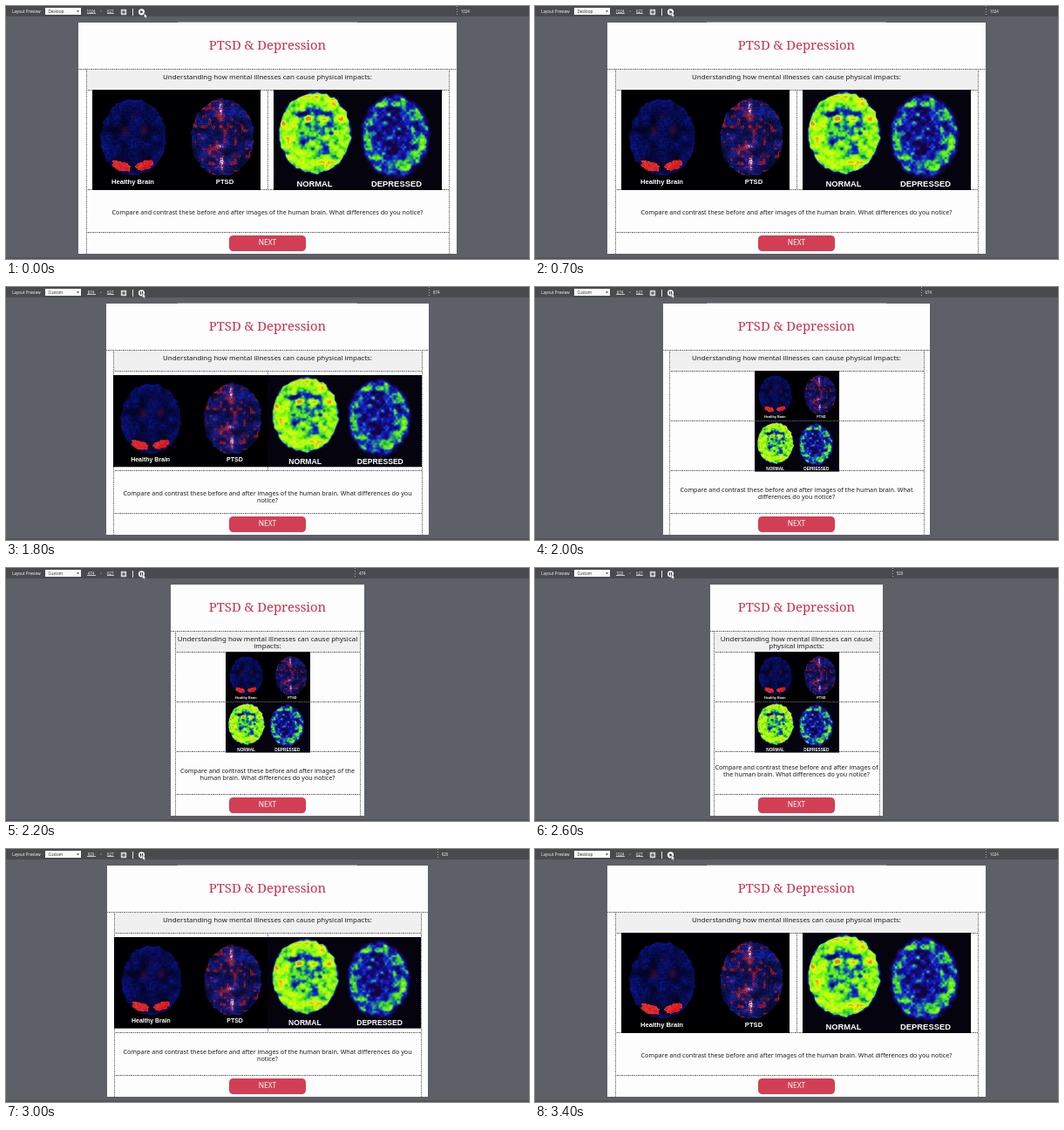
Write an HTML page with a canvas that moves like this. It is 600 by 290 pixels and loops after 3.5 s.

```html
<!DOCTYPE html>
<html lang="en">
<head>
<meta charset="utf-8">
<title>Layout Preview</title>
<style>
html, body { margin: 0; width: 100%; height: 100%; overflow: hidden; }
body { position: relative; background: #5d6066; font-family: "Noto Sans", "Open Sans", sans-serif; color: #1c1c1c; }
div, span, canvas, svg { position: absolute; box-sizing: border-box; white-space: nowrap; }
#bar { left: 0; top: 0; width: 600px; height: 12px; background: #494a4e; color: #f2f2f2; font-size: 4.6px; line-height: 6px; }
#bar span { top: 3.2px; }
#bar .num { font-size: 4.4px; border-bottom: .6px solid #c8c8c8; height: 6px; text-align: center; }
#menu { left: 45px; top: 2.3px; width: 41px; height: 7.4px; background: #fafafa; color: #333; padding: .6px 0 0 3.4px; }
#icons { left: 0; top: 0; width: 180px; height: 22px; }
#marker { top: 0; width: 1px; height: 12px; background: repeating-linear-gradient(#aaa 0 1.5px, transparent 1.5px 3px); }
#handle { left: 197px; top: 18px; width: 206px; height: 1px; background: #96979a; }
#foot { left: 0; top: 288px; width: 600px; height: 2px; background: #54565b; }
#page { top: 19px; height: 265px; background: #fefdfe; }
#band { top: 72px; height: 24px; background: #f0f0f0; }
.h { height: 1px; background: repeating-linear-gradient(90deg, #777 0 1.4px, #ccc 1.4px 2.4px); }
.v { width: 1px; background: repeating-linear-gradient(#888 0 1.4px, #ccc 1.4px 2.4px); }
.scan { width: 193px; height: 114.5px; transform-origin: 0 0; overflow: hidden; color: #fff; font: bold 7.6px/10px "Liberation Sans", Arial, sans-serif; }
.scan canvas { left: 0; top: 0; }
.scan span { width: 80px; text-align: center; }
#scanB { font-size: 9.4px; }
#title { left: 200px; width: 200px; top: 33.6px; text-align: center; font: 14.8px/20px "Noto Serif", serif; color: #c9304a; }
#head, #para { white-space: normal; text-align: center; }
#head { top: 76.5px; font-size: 7.94px; line-height: 8.2px; }
#para { font-size: 7.18px; line-height: 8px; }
#next { left: 256px; top: 262.5px; width: 88px; height: 18.5px; border-radius: 4.5px; background: #d23f54; color: #fff; text-align: center; font-size: 8.3px; line-height: 16.2px; }
</style>
</head>
<body>
<div id="foot"></div>
<div id="handle"></div>
<div id="page"></div>
<div id="band"></div>
<div class="h" id="row1"></div>
<div class="h" id="row2"></div>
<div class="h" id="split"></div>
<div class="h" id="row3"></div>
<div class="h" id="row4"></div>
<div class="v" id="colL"></div>
<div class="v" id="colR"></div>
<div class="v" id="mid"></div>
<div class="scan" id="scanA">
  <canvas width="193" height="115"></canvas>
  <span style="left:6.5px;top:101px">Healthy Brain</span>
  <span style="left:112px;top:101px">PTSD</span>
</div>
<div class="scan" id="scanB">
  <canvas width="193" height="115"></canvas>
  <span style="left:7px;top:103px">NORMAL</span>
  <span style="left:101px;top:103px">DEPRESSED</span>
</div>
<div id="title">PTSD &amp; Depression</div>
<div id="head">Understanding how mental illnesses can cause physical impacts:</div>
<div id="para">Compare and contrast these before and after images of the human brain. What differences do you notice?</div>
<div id="next">NEXT</div>
<div id="bar">
  <span style="left:7px">Layout Preview</span>
  <div id="menu">Desktop</div>
  <span class="num" id="width" style="left:92.5px;width:10px">1024</span>
  <span style="left:107.5px;color:#999">×</span>
  <span class="num" style="left:115.5px;width:8.5px">627</span>
  <div id="marker"></div>
  <span id="size" style="font-size:4.4px">1024</span>
</div>
<svg id="icons" viewBox="0 0 180 22">
  <path d="M81 5.2h3l-1.5 2z" fill="#444"/>
  <rect x="131.8" y="3.8" width="6.4" height="6.4" rx=".6" fill="#d4d4d4"/>
  <path d="M135 5v4M133 7h4" stroke="#45464a"/>
  <path d="M145.5 3v8" stroke="#e4e4e4"/>
  <circle cx="155.5" cy="6.8" r="3.6" fill="#f6f6f6"/>
  <path id="play" d="M154.4 4.9v3.8l3-1.9z" fill="#333"/>
  <path id="pause" d="M154.5 5v3.6M156.5 5v3.6" stroke="#333"/>
  <path id="cursor" d="M0 0v5.8l1.4-1.2 1 2.1 1-.4-1-2.1h1.9z" fill="#fff" stroke="#222" stroke-width=".4"/>
</svg>
<script>
const $ = id => document.getElementById(id);
const clamp = (v, a = 0, b = 1) => Math.min(b, Math.max(a, v));

function hash(x, y) {
  const n = Math.sin(x * 127.1 + y * 311.7) * 43758.5453;
  return n - Math.floor(n);
}

function noise(x, y) {
  const i = Math.floor(x), j = Math.floor(y);
  const ease = f => f * f * (3 - 2 * f);
  const u = ease(x - i), v = ease(y - j);
  const a = hash(i, j) * (1 - u) + hash(i + 1, j) * u;
  const b = hash(i, j + 1) * (1 - u) + hash(i + 1, j + 1) * u;
  return a * (1 - v) + b * v;
}

// Each blob is x, y, x radius, y radius, strength.
const blobSum = (x, y, list) => list.reduce((sum, [cx, cy, rx, ry, k]) =>
  sum + k * Math.exp(-(((x - cx) / rx) ** 2) - ((y - cy) / ry) ** 2), 0);
const mix = (a, b, k) => a.map((v, i) => v + (b[i] - v) * k);
const radius = (x, y, cx, cy, rx, ry) => Math.hypot((x - cx) / rx, (y - cy) / ry);

const ramp = [
  [0, 4, 3, 14], [.14, 24, 4, 62], [.28, 16, 14, 130], [.42, 24, 40, 215], [.52, 30, 130, 140],
  [.6, 60, 220, 40], [.76, 150, 252, 15], [.95, 225, 250, 20], [1.15, 235, 80, 20]
];
function heat(v) {
  let i = 1;
  while (i < ramp.length - 1 && v > ramp[i][0]) i++;
  const a = ramp[i - 1], b = ramp[i];
  return mix(a, b, clamp((v - a[0]) / (b[0] - a[0]))).slice(1);
}

function paint(id, rule) {
  const c = $(id).querySelector('canvas'), g = c.getContext('2d');
  const img = g.createImageData(c.width, c.height);
  for (let p = 0; p < c.width * c.height; p++)
    img.data.set([...rule(p % c.width, Math.floor(p / c.width)), 255], p * 4);
  g.putImageData(img, 0, 0);
}

function lobe(x, y, cx, cy, ry, turn) {
  const dx = x - cx, dy = y - cy, c = Math.cos(turn), s = Math.sin(turn);
  return radius(dx * c + dy * s, dy * c - dx * s, 0, 0, 11, ry) + (noise(x / 3, y / 3) - .5) * .4;
}

const spots = [[37, 47, 4, 5, .4], [59, 46, 4, 5, .4], [47, 30, 3, 4, .2]];
const sparks = [
  [147, 24, 2.6, 11, 1.1], [146, 64, 6, 3, .7], [148, 83, 2.5, 9, 1.1],
  [134, 72, 5, 4, .5], [163, 75, 4, 3, .4], [149, 45, 4, 3, .4]
];
function fibres(x, y) {
  const fine = (1 - Math.abs(2 * noise(x / 3.6, y / 3.6) - 1)) ** 3;
  const patch = noise(x / 9 + 3, y / 9);
  const grain = hash(x, y);
  const wob = (noise(x / 4, y / 4) - .5) * .06;
  let d = radius(x, y, 46.5, 54, 37.5, 43.5) + wob;
  let rgb = [0, 0, 3];
  if (d < 1) {
    const k = .12 + .55 * fine * patch + .2 * grain + .35 * patch + .2 * clamp((d - .75) * 4);
    rgb = mix([10 * k, 20 * k, 140 * k], [120, 15, 45], blobSum(x, y, spots));
  }
  if (Math.min(lobe(x, y, 32.5, 87, 5.6, .35), lobe(x, y, 60, 86, 4.8, -.3)) < 1)
    rgb = [200 + 35 * grain, 22 + 40 * fine, 28 + 30 * fine];
  d = radius(x, y, 149, 54, 36, 44) + wob;
  if (d < 1) {
    const k = .1 + .6 * fine * patch + .35 * grain + .4 * patch;
    rgb = [22 * k, 32 * k, 160 * k];
    const red = clamp((noise(x / 4.2 + 9, y / 4.2 + 4) - .64) * 5) * (.3 + .7 * grain);
    rgb = mix(rgb, [185, 25, 45], red);
    const glow = blobSum(x, y, sparks);
    rgb = mix(rgb, [205, 50, 85], clamp(glow * .65));
    rgb = mix(rgb, [250, 225, 235], clamp(glow * (grain + fine) - .45));
  }
  return rgb;
}

const active = [
  [34, 27, 9, 4, -.4], [47, 23, 5, 6, -.45], [61, 27, 9, 4, -.4], [47, 39, 9, 6, -.32],
  [29, 40, 3, 8, -.3], [65, 41, 4, 7, -.3], [35, 59, 4, 3, -.28], [58, 67, 4, 4, -.28],
  [39, 32, 4, 4, .55], [55, 32, 4, 4, .55], [67, 9, 3, 3, .3], [11, 37, 3, 4, .25]
];
const quiet = [
  [138, 64, 9, 9, -.2], [139, 38, 7, 9, -.16], [117, 33, 6, 9, .18], [165, 27, 7, 8, .18],
  [121, 79, 8, 7, .18], [152, 88, 8, 5, .16], [168, 62, 6, 8, .15], [123, 16, 8, 5, .18],
  [148, 12, 7, 4, .14], [107, 56, 5, 7, .14]
];
function scan(x, y) {
  const n = .65 * noise(x / 5.5, y / 5.5) + .35 * noise(x / 2.6 + 7, y / 2.6) - .5;
  const wob = (noise(x / 5, y / 5) - .5) * .07;
  const ring = d => Math.exp(-(((d - .78) / .17) ** 2));
  let d = radius(x, y, 47, 49, 42.5, 48) + wob;
  if (d < 1) {
    const v = .68 + ring(d) * .12 + n * .75 + blobSum(x, y, active);
    return heat(Math.min(v, 1.08) * clamp((1 - d) * 18));
  }
  d = radius(x, y, 139, 53, 41, 49.5) + wob;
  if (d < 1) {
    const v = .36 + ring(d) * .05 + n * .75 + blobSum(x, y, quiet);
    return heat(Math.max(v, .12) * clamp((1 - d) * 9));
  }
  return [4, 3, 14];
}

paint('scanA', fibres);
paint('scanB', scan);

const FULL = 1024, LEAST = 320, STACK = 768;
function viewport(t) {
  if (t < 1650) return FULL;
  if (t < 2400) return Math.max(LEAST, FULL - (t - 1650));
  return Math.min(FULL, LEAST + t - 2400);
}

const halfOf = w => w * .2115;
const insetOf = half => half - Math.min(8.4, half * .045);

function place(id, x, y, w, h) {
  const s = $(id).style;
  s.left = x + 'px';
  if (y != null) s.top = y + 'px';
  if (w != null) s.width = w + 'px';
  if (h != null) s.height = h + 'px';
}
function placeScan(id, x, y, k) {
  place(id, x, y);
  $(id).style.transform = `scale(${k})`;
}
const show = (id, on) => { $(id).style.display = on ? '' : 'none'; };

function draw(t) {
  const label = viewport(t);
  // The page starts to trail its width by one update during the shrink.
  const w = t > 1800 ? viewport(t - 50) : label;
  const half = halfOf(w), inset = insetOf(half);
  const left = Math.round(300 - half), pw = 600 - 2 * left;
  const il = Math.round(300 - inset), iw = 600 - 2 * il;
  const stacked = w < STACK;

  place('page', left, null, pw);
  place('band', il, null, iw);
  place('row1', left, 72, pw);
  place('row2', il, 96, iw);
  place('split', il, 153, iw);
  place('row3', il, 210, iw);
  place('row4', il, 259, iw);
  place('colL', il, 72, null, 212);
  place('colR', il + iw, 72, null, 212);
  place('mid', 300, 96, null, 115);
  show('split', stacked);
  show('mid', !stacked);
  show('handle', half > 120);

  const col = iw / 2, k = stacked ? 97 / 193 : Math.min(1, col / 193);
  if (stacked) {
    placeScan('scanA', 251.5, 96, k);
    placeScan('scanB', 251.5, 153.5, k);
  } else {
    const gap = Math.floor((col - 193 * k) / 2), top = Math.round(153.3 - 57.25 * k);
    placeScan('scanA', il + gap, top, k);
    placeScan('scanB', 300 + gap, top, k);
  }

  // Vertical centring trails the wrapping by one step.
  const before = 2 * insetOf(halfOf(viewport(t - 100)));
  const lines = Math.ceil(358 / before * 1.04 - .04);
  place('head', il, null, iw);
  place('para', il, 232.4 - (lines - 1) * 4, iw);

  const edge = 300 + label * .2125;
  place('marker', Math.floor(edge));
  place('size', edge + 4.2);
  $('width').textContent = $('size').textContent = label;
  $('menu').firstChild.data = label === FULL ? 'Desktop' : 'Custom';

  const playing = t >= 1600 && t < 3200;
  show('play', !playing);
  show('pause', playing);
  const move = clamp(t / 600);
  $('cursor').setAttribute('transform', `translate(${158.4 - 2 * move} ${8.2 - 1.2 * move})`);
}

const start = performance.now();
let last = -1;
function loop() {
  const t = Math.floor((performance.now() - start) % 3500 / 100) * 100;
  if (t !== last) draw(last = t);
  requestAnimationFrame(loop);
}
loop();
</script>
</body>
</html>
```
